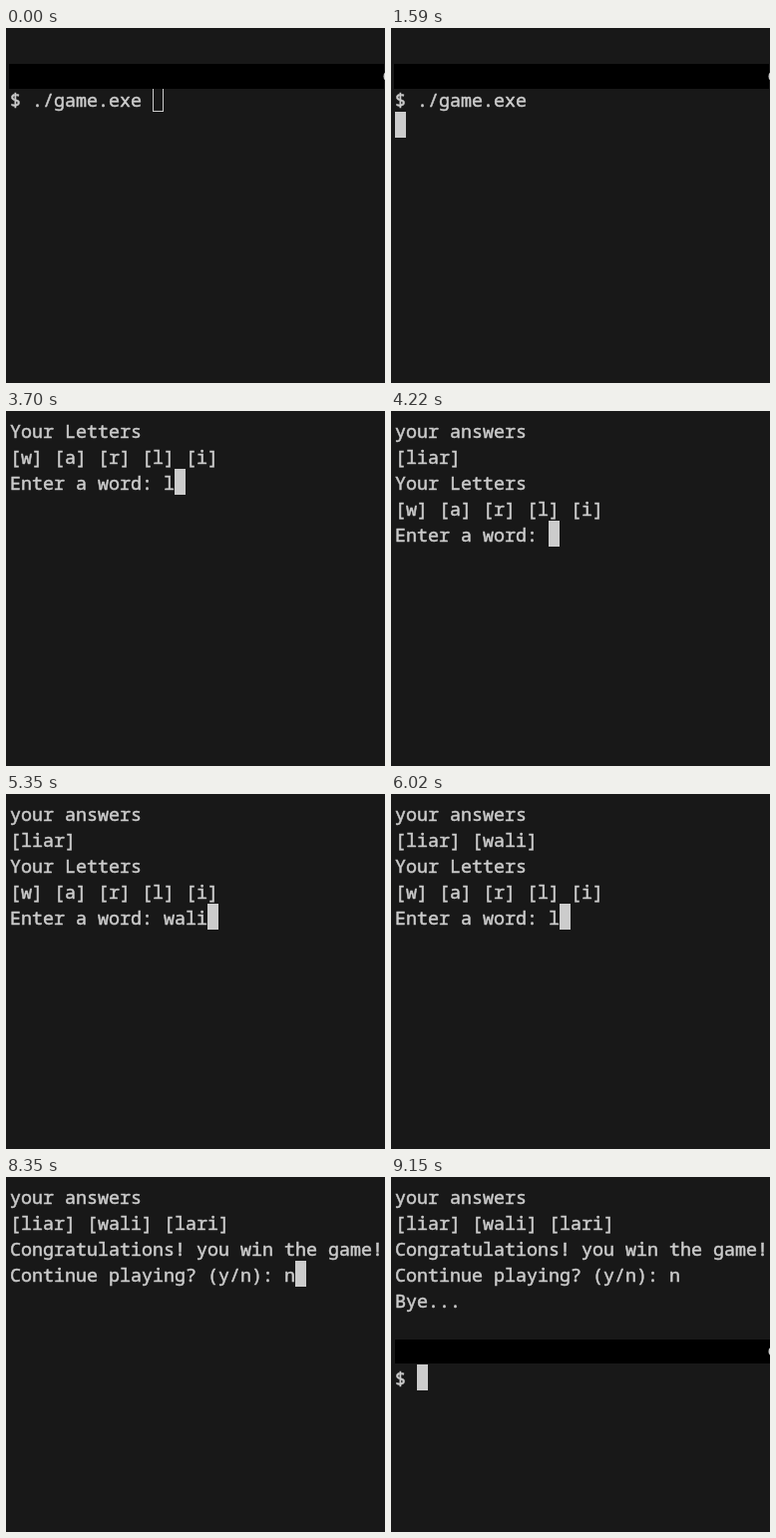
An HTML page with a canvas for the animation above (9220 ms loop, 380 px wide and 356 px high).

```html
<!DOCTYPE html>
<html lang="en">
<head>
<meta charset="utf-8">
<title>Terminal word game</title>
<style>
  html, body { margin: 0; width: 100%; height: 100%; overflow: hidden; background: #181818; }
  canvas { display: block; }
</style>
</head>
<body>
<canvas id="stage" width="380" height="356"></canvas>
<script>
const LOOP = 9220, CELL = 11, ROW = 26, LEFT = 4, TOP = 6;
const INK = '#cccccc', PAPER = '#181818';
const ctx = document.getElementById('stage').getContext('2d');

const letters = 'Your Letters\n[w] [a] [r] [l] [i]\nEnter a word: ';
const answers = 'your answers\n';
const launch = '\n\n$ ./game.exe ';
const welcome = launch + '\nWelcome to Word Guess Game\nChoose the letters bag\n=====\n';
const menu = welcome + '1) Letter Bag 1\n2) Letter Bag 2\n3) Letter Bag 3\n=====\nEnter your choice: ';
const second = answers + '[liar]\n' + letters;
const third = answers + '[liar] [wali]\n' + letters;
const win = answers + '[liar] [wali] [lari]\nCongratulations! you win the game!\nContinue playing? (y/n): ';
const bye = win + 'n\nBye...\n';

const topBar = [3, 36, 376, 25];
const lowBar = [4, 163, 376, 24];

// Each state: start time, terminal text (the cursor follows it), covered prompt line.
const states = [
  [0, launch, topBar],
  [1590, launch + '\n', topBar],
  [1740, welcome, topBar],
  [1820, menu, topBar],
  [2220, menu + '1', topBar],
  [2480, letters],
  ...typed(letters, 'liar', [3700, 3830, 3900, 3970]),
  [4160, letters + 'liar\n'],
  [4220, second],
  ...typed(second, 'wali', [5020, 5090, 5150, 5350]),
  [5480, second + 'wali\n'],
  [5540, third],
  [5940, third + 'l'],
  [6040, third + 'la'],
  [6150, third + 'lari'],
  [6350, third + 'lari\n'],
  [6420, win],
  [8350, win + 'n'],
  [8880, bye],
  [9150, bye + '\n\n$ ', lowBar],
];
const FOCUS = 430;

function typed(before, word, times) {
  return times.map((t, i) => [t, before + word.slice(0, i + 1)]);
}

// A hairline outline gives the letters the weight of terminal type.
function drawLine(line, row) {
  const y = TOP + 21 + row * ROW;
  ctx.lineWidth = 0.5;
  ctx.fillText(line, LEFT, y);
  ctx.strokeText(line, LEFT, y);
}

function drawCursor(col, row, focused) {
  const x = LEFT + col * CELL, y = TOP + row * ROW;
  ctx.lineWidth = 1;
  if (focused) {
    ctx.fillRect(x, y, CELL, ROW);
  } else {
    ctx.strokeRect(x + 0.5, y + 0.5, CELL - 1, ROW - 1);
  }
}

function drawBar([x, y, w, h]) {
  ctx.fillStyle = '#000';
  ctx.fillRect(x, y, w, h);
  ctx.fillStyle = INK;
  ctx.beginPath();
  ctx.ellipse(381, y + h / 2, 2.5, 4, 0, 0, Math.PI * 2);
  ctx.fill();
}

function draw(now) {
  const t = now % LOOP;
  const [, text, bar] = states.findLast(s => s[0] <= t);
  const lines = text.split('\n');
  ctx.fillStyle = PAPER;
  ctx.fillRect(0, 0, 380, 356);
  ctx.fillStyle = ctx.strokeStyle = INK;
  ctx.font = '18.333px "Noto Sans Mono", monospace';
  lines.forEach(drawLine);
  drawCursor(lines.at(-1).length, lines.length - 1, t >= FOCUS);
  if (bar) drawBar(bar);
  requestAnimationFrame(() => draw(performance.now() - start));
}

const start = performance.now();
draw(0);
</script>
</body>
</html>
```
